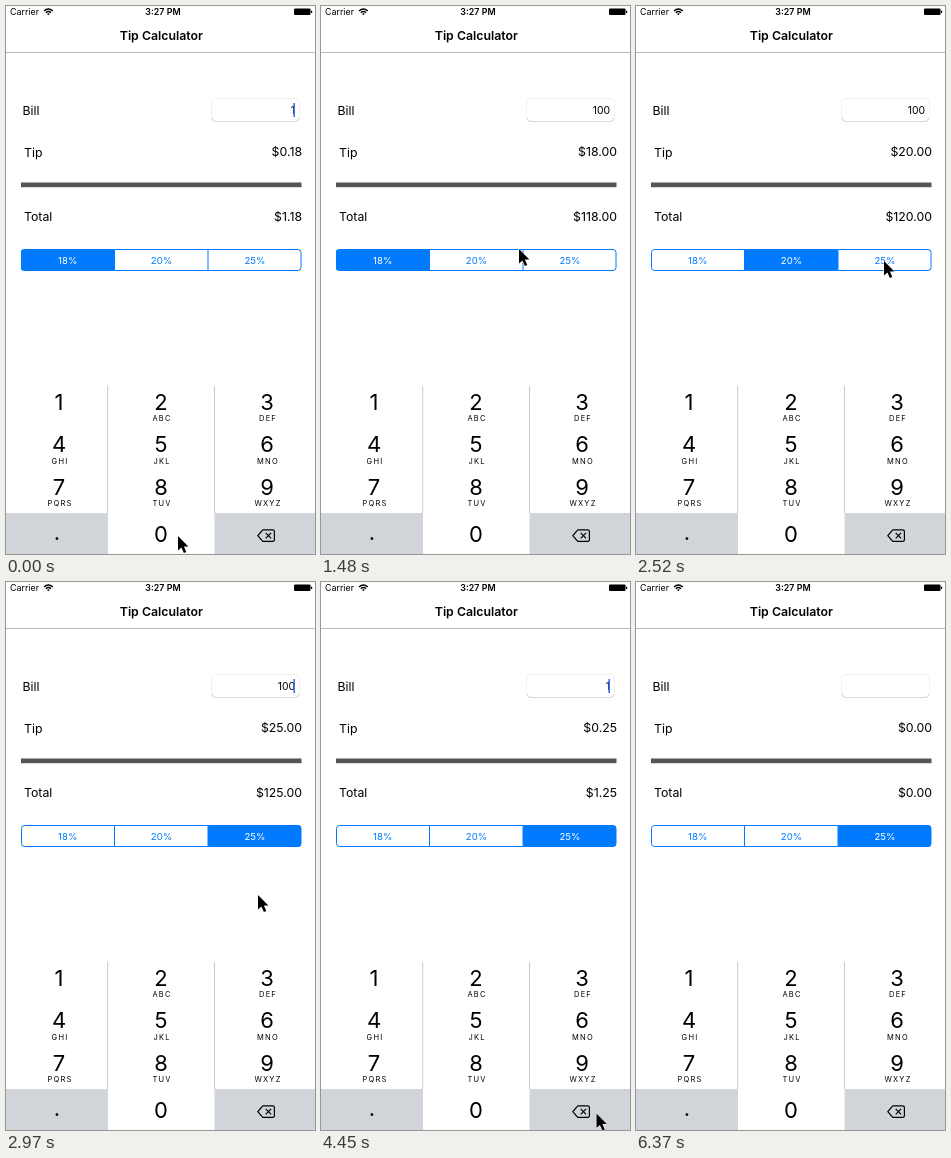
These frames come from a looping animation (309x548 px, 6520 ms). An HTML page:

```html
<!DOCTYPE html>
<html lang="en">
<head>
<meta charset="utf-8">
<title>Tip Calculator</title>
<style>
  html, body { margin: 0; width: 100%; height: 100%; overflow: hidden; background: #fff; }
  svg { display: block; width: 100vw; height: 100vh; }
  text { font: 12.3px Inter, sans-serif; }
  .status { font-size: 8.9px; }
  .bold { font-weight: 600; }
  .field { font-size: 10.4px; }
  .segment { font-size: 9.6px; }
  .digit { font-size: 22px; }
  .letters { font-size: 7.5px; letter-spacing: 1.2px; }
  .middle { text-anchor: middle; }
  .end { text-anchor: end; }
</style>
</head>
<body>
<svg viewBox="0 0 309 548">
  <text class="status" x="4" y="9">Carrier</text>
  <g fill="none" stroke="#000" stroke-width="1.4">
    <path d="M38 4.9Q42.4 1 46.8 4.9M39.8 6.7Q42.4 4.4 45 6.7"/>
    <path d="M42.4 9.2L41 7.8Q42.4 6.6 43.8 7.8Z" fill="#000" stroke="none"/>
  </g>
  <text class="status bold middle" x="157" y="9">3:27 PM</text>
  <rect x="288" y="2.5" width="16.5" height="6.5" rx="1"/>
  <rect x="305" y="4.5" width="1.2" height="2.6" rx=".5"/>
  <text class="bold middle" x="155.3" y="34">Tip Calculator</text>
  <path d="M0 46.5H309" stroke="#b8b8b8"/>

  <text x="16.5" y="108.5">Bill</text>
  <rect x="205.5" y="92.5" width="88" height="23" rx="4" fill="#fff" stroke="#f1f1f1"/>
  <path d="M206 112q.5 3.5 4 3.5H289q3.5 0 4-3.5" fill="none" stroke="#d9d9d9"/>
  <text id="bill" class="field end" x="289" y="108"></text>
  <rect id="caret" x="287.4" y="97" width="1.6" height="14" fill="#426bf2"/>
  <text x="18" y="150.7">Tip</text>
  <text id="tip" class="end" x="296" y="150.2"></text>
  <rect x="15" y="176.5" width="280.5" height="4.7" fill="#555558"/>
  <text x="18" y="215.3">Total</text>
  <text id="total" class="end" x="296" y="215"></text>

  <g id="segments"></g>
  <path d="M108.5 243.5V264.5M202 243.5V264.5" stroke="#007aff"/>
  <rect x="15.5" y="243.5" width="279.5" height="21" rx="3" fill="none" stroke="#007aff"/>

  <g id="keys"></g>
  <path d="M101.7 380V507M208.5 380V507" stroke="#c9cbce"/>
  <g stroke="#000" stroke-width="1.2" stroke-linejoin="round">
    <path id="eraser" d="M251.8 529.6L256.8 523.8H266.7Q268.4 523.8 268.4 525.5V533.7Q268.4 535.4 266.7 535.4H256.8Z"/>
    <path id="cross" d="M259.7 526.8L265.1 532.4M265.1 526.8L259.7 532.4"/>
  </g>
  <path id="pointer" d="M0 0V14.5L3.4 11.4L5.9 17L8.3 16L5.9 10.5H10.4Z" stroke="#fff" stroke-width="1" paint-order="stroke"/>
</svg>
<script>
const LOOP = 6520, STEP = 148.3, LAST_STEP = 43;
const BLUE = '#007aff', GREY = '#d1d5da', WHITE = '#fff';
const $ = id => document.getElementById(id);

// Each entry is [step, value], held until the next entry.
const bills = [[0, '1'], [3, '10'], [6, '100'], [24, '10'], [29, '1'], [37, '']];
const rates = [[0, 18], [14, 20], [19, 25]];
const presses = [[0, ''], [2, '0'], [3, ''], [4, '0'], [6, ''], [24, 'erase'],
  [26, ''], [28, 'erase'], [30, ''], [37, 'erase'], [39, '']];
const carets = [[0, 1], [10, 0], [13, 1], [16, 0], [19, 1], [22, 0], [24, 1],
  [34, 0], [37, 1], [41, 0]];

// Pointer stops as [step, x, y].
const pointerPath = [[0, 172, 530], [5, 170.5, 532], [6, 170.5, 532], [7, 176, 455],
  [8, 186, 347], [9, 194, 265], [10, 198, 243], [12, 168, 253], [13, 160, 255],
  [14, 160, 255], [16, 228, 254], [17, 248, 255], [19, 248, 256], [21, 256, 370],
  [23, 273, 515], [24, 274.5, 530], [30, 275.5, 531.5], [41, 275.5, 531.5],
  [42, 275.5, 538], [43, 275.5, 570]];

const held = (track, step) => track.findLast(([start]) => start <= step)[1];

function pointerAt(step) {
  const next = pointerPath.findIndex(([at]) => at >= step);
  const [t1, x1, y1] = pointerPath[next];
  const [t0, x0, y0] = pointerPath[Math.max(0, next - 1)];
  const part = t1 > t0 ? (step - t0) / (t1 - t0) : 0;
  return [x0 + (x1 - x0) * part, y0 + (y1 - y0) * part];
}

const label = (kind, x, y, content, id = '') =>
  `<text ${id && `id="${id}"`} class="${kind} middle" x="${x}" y="${y}">${content}</text>`;

const segments = [[18, 15, 93.5, 61.7], [20, 108.5, 93.5, 155.5], [25, 202, 93, 249]];
$('segments').innerHTML = segments.map(([rate, x, width, center]) =>
  `<rect id="segment${rate}" x="${x}" y="243.5" width="${width}" height="21" rx="2"/>` +
  label('segment', center, 257.6, rate + '%', 'rate' + rate)).join('');

const centers = [53, 155, 261];
const letters = ['', 'ABC', 'DEF', 'GHI', 'JKL', 'MNO', 'PQRS', 'TUV', 'WXYZ'];
$('keys').innerHTML =
  `<rect y="507" width="102" height="41" fill="${GREY}"/>
   <rect id="zeroKey" x="102" y="507" width="106.5" height="41"/>
   <rect id="eraseKey" x="208.5" y="507" width="100.5" height="41"/>` +
  letters.map((group, i) => {
    const x = centers[i % 3], y = 404 + 42.4 * Math.floor(i / 3);
    return label('digit', x, y, i + 1) + label('letters', x + 1, y + 11.3, group);
  }).join('') +
  label('digit', 51, 534, '.') + label('digit', 155, 536.3, '0');

function draw(time) {
  const step = Math.min(LAST_STEP, Math.floor((time % LOOP + 8) / STEP));
  const bill = held(bills, step), rate = held(rates, step), pressed = held(presses, step);
  const tip = bill * rate / 100;
  $('bill').textContent = bill;
  $('tip').textContent = '$' + tip.toFixed(2);
  $('total').textContent = '$' + (+bill + tip).toFixed(2);
  $('caret').setAttribute('opacity', held(carets, step));

  for (const [value] of segments) {
    const chosen = value === rate;
    $('segment' + value).setAttribute('fill', chosen ? BLUE : WHITE);
    $('rate' + value).setAttribute('fill', chosen ? WHITE : BLUE);
  }

  const erasing = pressed === 'erase';
  $('zeroKey').setAttribute('fill', pressed === '0' ? GREY : WHITE);
  $('eraseKey').setAttribute('fill', erasing ? WHITE : GREY);
  $('eraser').setAttribute('fill', erasing ? '#000' : 'none');
  $('cross').setAttribute('stroke', erasing ? WHITE : '#000');
  $('pointer').setAttribute('transform', `translate(${pointerAt(step)})`);
}

function tick() {
  draw(performance.now());
  requestAnimationFrame(tick);
}
tick();
</script>
</body>
</html>
```
